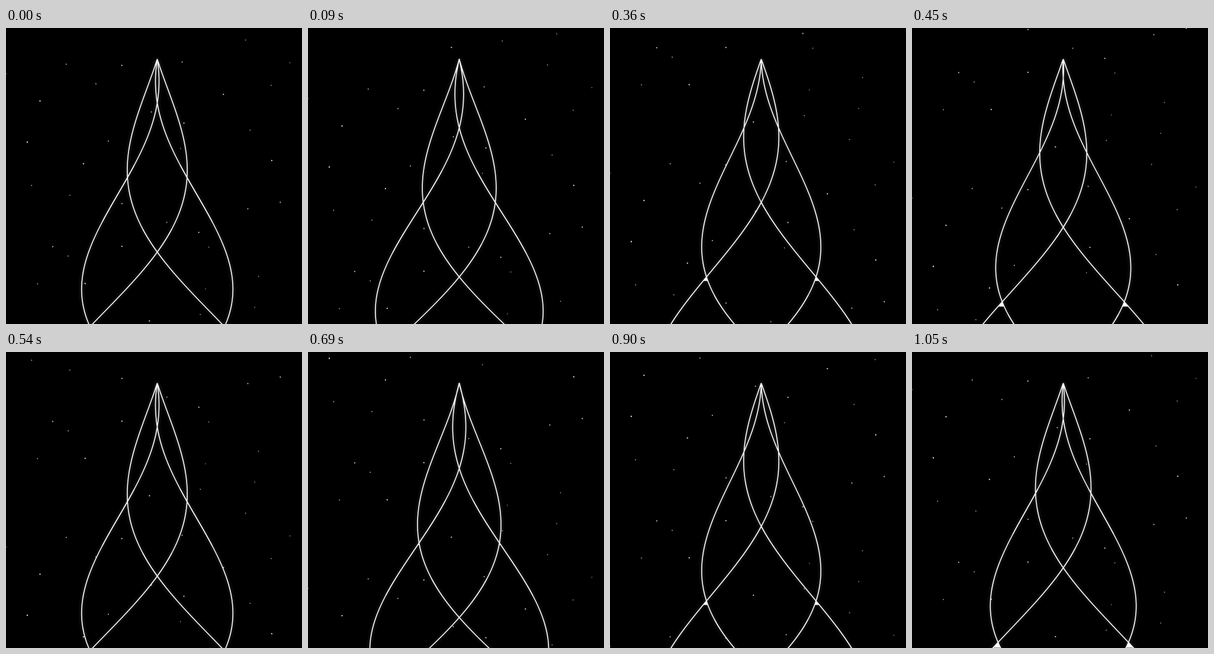
Animation of 500x500 px, one loop 1080 ms. Source, as an HTML page with a canvas:

```html
<!DOCTYPE html>
<html>
<head>
<meta charset="utf-8">
<style>
html, body { margin: 0; width: 100%; height: 100%; overflow: hidden; background: #000; }
canvas { display: block; }
</style>
</head>
<body>
<canvas id="stage" width="500" height="500"></canvas>
<script>
const ctx = document.getElementById('stage').getContext('2d');
const STEP = 30, STEPS = 36, SPEED = 14;
const WRAP = STEPS * SPEED, WAVE = 2 * WRAP;
const CX = 255.5, TOP = 52.5, SLOPE = 0.3556;
const GRID = 6, CELL = WRAP / GRID;

let seed = 7;
function random() {
  seed = seed * 16807 % 2147483647;
  return seed / 2147483647;
}

// One star per grid cell keeps the scatter even.
const stars = Array.from({ length: GRID * GRID }, (_, i) => ({
  x: (i % GRID + random()) * CELL,
  y: (Math.floor(i / GRID) + random()) * CELL,
  light: random()
}));

// Strand k winds around a cone that widens downwards.
function strandX(y, k, shift) {
  const angle = 2 * Math.PI * (y - 126.5 - shift) / WAVE + k * Math.PI / 2;
  return CX + SLOPE * (y - TOP) * Math.sin(angle);
}

function drawStars(shift) {
  for (const { x, y, light } of stars) {
    ctx.fillStyle = `rgba(255,255,255,${0.55 + 0.3 * light})`;
    ctx.beginPath();
    ctx.arc(x, (y + shift) % WRAP, 0.8 + 0.4 * light, 0, 2 * Math.PI);
    ctx.fill();
  }
}

function drawStrands(shift) {
  ctx.beginPath();
  for (let k = 0; k < 4; k++) {
    ctx.moveTo(CX, TOP);
    for (let y = TOP + 2; y <= 506; y += 2) ctx.lineTo(strandX(y, k, shift), y);
  }
  ctx.save();
  ctx.strokeStyle = '#fff';
  ctx.lineWidth = 1.6;
  ctx.lineJoin = 'round';
  ctx.shadowColor = 'rgba(255,255,255,0.35)';
  ctx.shadowBlur = 5;
  ctx.stroke();
  ctx.restore();
}

// Small wedges below the lower side crossings.
function drawWedges(shift) {
  const y = 252.5 + shift % 252;
  const depth = (y - 220) / 30;
  const spread = SLOPE * Math.SQRT1_2;
  const turn = spread * (y - TOP) * 2 * Math.PI / WAVE;
  ctx.fillStyle = '#fff';
  for (const side of [-1, 1]) {
    const x = CX + side * spread * (y - TOP);
    ctx.beginPath();
    ctx.moveTo(x, y);
    ctx.lineTo(x + side * (spread + turn) * depth, y + depth);
    ctx.lineTo(x + side * (spread - turn) * depth, y + depth);
    ctx.fill();
  }
}

function draw() {
  const shift = Math.floor(performance.now() / STEP) % STEPS * SPEED;
  ctx.fillStyle = '#000';
  ctx.fillRect(0, 0, 500, 500);
  drawStars(shift);
  drawStrands(shift);
  drawWedges(shift);
  requestAnimationFrame(draw);
}
draw();
</script>
</body>
</html>
```
